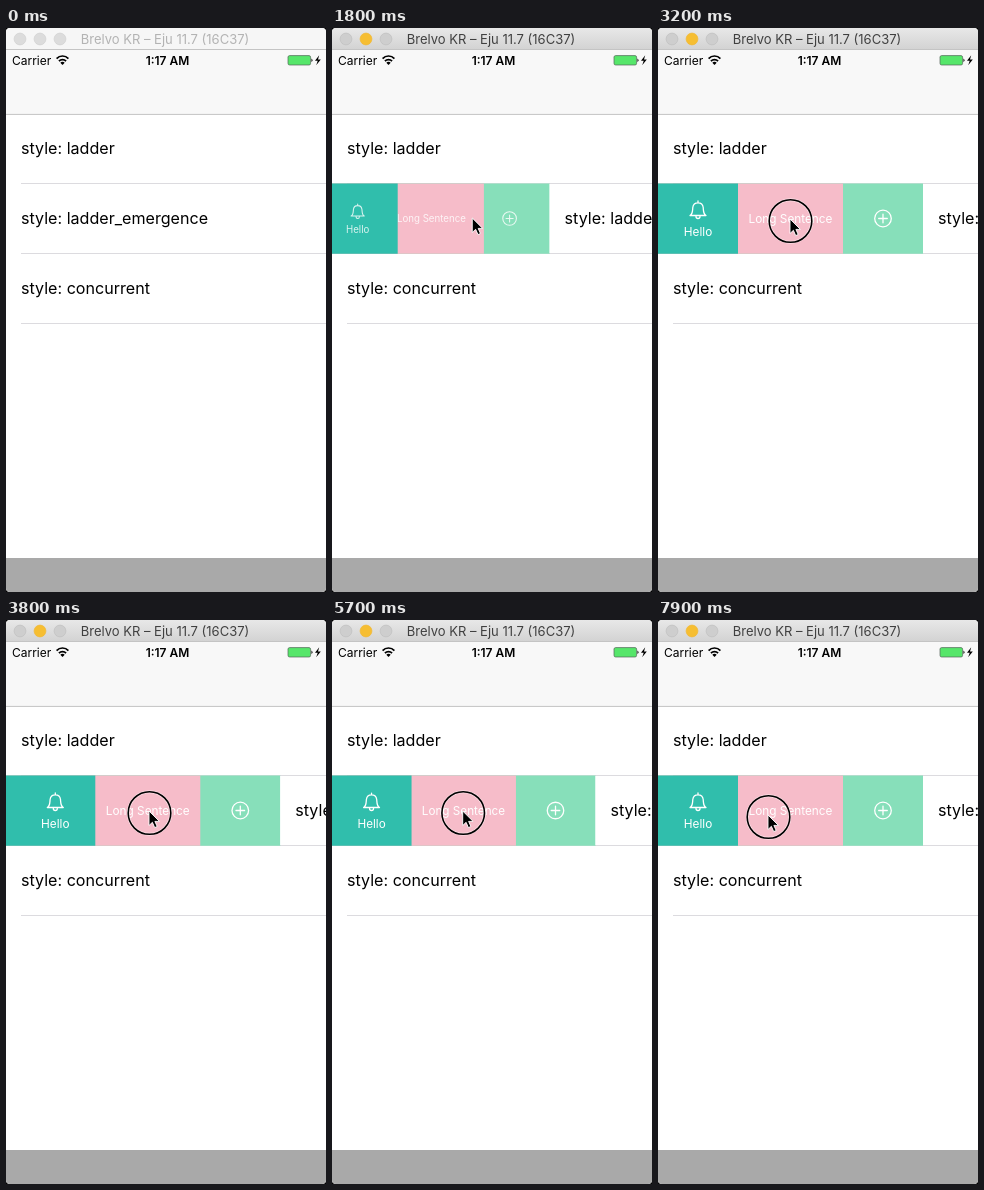
An HTML page that plays this animation: 320 by 564 pixels, repeating every 8000 ms.

```html
<!DOCTYPE html>
<html lang="en">
<head>
<meta charset="utf-8">
<title>Swipe cell styles</title>
<style>
  html, body { margin: 0; height: 100%; overflow: hidden; background: #000; }
  svg { display: block; width: 100%; height: 100%; font-family: Inter, "Open Sans", sans-serif; }
  .row { font-size: 16.1px; fill: #000; }
  .status { font-size: 12px; fill: #000; }
  .label { font-size: 11.8px; fill: #fff; text-anchor: middle; }
  .icon { fill: none; stroke: #fff; stroke-width: 1.3; stroke-linecap: round; stroke-linejoin: round; }
  .light { fill: #dcdcdc; stroke: #d4d4d4; stroke-width: .8; }
  #bar { fill: #f6f6f6; }
  #title { font-size: 13px; text-anchor: middle; fill: #b3b3b3; }
  .active #bar { fill: url(#metal); }
  .active #title { fill: #404040; }
  .active .light { fill: #cecece; stroke: #c2c2c2; }
  .active .yellow { fill: #f6be32; stroke: #f0b93a; }
</style>
</head>
<body>
<svg id="stage" viewBox="0 0 320 564">
  <defs>
    <linearGradient id="metal" x2="0" y2="1">
      <stop stop-color="#e8e8e8"/><stop offset="1" stop-color="#d2d2d2"/>
    </linearGradient>
    <clipPath id="window"><rect width="320" height="564" rx="4"/></clipPath>
    <clipPath id="cellArea"><rect y="155.4" width="320" height="70.3"/></clipPath>
  </defs>
  <g clip-path="url(#window)">
    <rect width="320" height="564" fill="#fff"/>
    <rect id="bar" width="320" height="22"/>
    <path d="M0 21.5H320" stroke="#c4c4c4"/>
    <circle class="light" cx="14" cy="11" r="5.9"/>
    <circle class="light yellow" cx="34" cy="11" r="5.9"/>
    <circle class="light" cx="54" cy="11" r="5.9"/>
    <text id="title" x="159" y="16">Brelvo KR – Eju 11.7 (16C37)</text>

    <rect y="22" width="320" height="64" fill="#f8f8f8"/>
    <path d="M0 86.4H320" stroke="#c3c3c3"/>
    <text class="status" x="6" y="36.7">Carrier</text>
    <g fill="none" stroke="#000" stroke-width="1.7">
      <path d="M50.6 30.6a8 8 0 0 1 11.8 0M52.9 33.1a5 5 0 0 1 7.2 0"/>
      <path d="M56.5 37l-2.2-2.3a3.2 3.2 0 0 1 4.4 0z" fill="#000" stroke="none"/>
    </g>
    <text class="status" x="161.5" y="36.7" font-weight="600" text-anchor="middle">1:17 AM</text>
    <rect x="282" y="27.6" width="22.6" height="9.4" rx="1.6" fill="#56e66a" stroke="#55645a" stroke-width=".7"/>
    <path d="M305.4 30.5a2 2 0 0 1 0 3.6z" fill="#222"/>
    <path d="M313.2 27.2l-4.2 5.6h2.7l-1.5 4.4 4.6-5.8h-2.8z"/>

    <text class="row" x="15" y="126">style: ladder</text>
    <text class="row" x="15" y="266">style: concurrent</text>
    <path d="M15 155.5H320M15 225.5H320M15 295.5H320" stroke="#dcdbdf"/>

    <g clip-path="url(#cellArea)">
      <g class="button">
        <rect x="-400" y="155" width="400" height="71" fill="#87dfba"/>
        <g class="content icon">
          <circle cy="190.5" r="8.3"/><path d="M-4.3 190.5H4.3M0 186.2V194.8"/>
        </g>
      </g>
      <g class="button">
        <rect x="-400" y="155" width="400" height="71" fill="#f6bcc9"/>
        <g class="content"><text class="label" y="195.3">Long Sentence</text></g>
      </g>
      <g class="button">
        <rect x="-400" y="155" width="400" height="71" fill="#30beac"/>
        <g class="content">
          <path class="icon" d="M-8 187.5C-5 186-5.5 182-5.2 179.5C-4.8 176-2.5 174.8 0 174.8S4.8 176 5.2 179.5C5.5 182 5 186 8 187.5ZM-2 188.5a2 2 0 0 0 4 0M0 173v1.5"/>
          <text class="label" y="207.8">Hello</text>
        </g>
      </g>
      <g id="cell">
        <rect y="156" width="320" height="69" fill="#fff"/>
        <text class="row" x="15" y="196">style: ladder_emergence</text>
      </g>
    </g>

    <rect y="530" width="320" height="34" fill="#a9a9a9"/>
    <g id="pointer">
      <g id="ring" fill="none">
        <circle cx=".5" cy="2" r="21.2" stroke="#fff" stroke-opacity=".5" stroke-width="3"/>
        <circle cx=".5" cy="2" r="21.3" stroke="#000" stroke-width="1.6"/>
      </g>
      <path d="M0 0V14.5L3.4 11.3L5.7 16.6L8.2 15.5L5.9 10.4H10.4Z" stroke="#fff" stroke-width=".9"/>
    </g>
  </g>
</svg>
<script>
const LOOP = 8000, STEP = 100, OPEN = 265;
const $ = id => document.getElementById(id);
const stage = $('stage'), cell = $('cell'), pointer = $('pointer'), ring = $('ring');
const [plus, sentence, hello] = document.querySelectorAll('.button');

const smooth = u => u * u * (3 - 2 * u);
const easeOut = u => 1 - (1 - u) ** 3;
const mix = (a, b, u) => a + (b - a) * u;

// Each key is [time, value, easing into this key].
function track(keys, t) {
  const i = keys.findIndex(key => key[0] > t);
  if (i < 0) return keys[keys.length - 1][1];
  if (i === 0) return keys[0][1];
  const [t0, v0] = keys[i - 1], [t1, v1, ease = smooth] = keys[i];
  return mix(v0, v1, ease((t - t0) / (t1 - t0)));
}

const pointerX = [[500, 97], [1200, 35.5], [1300, 35.5], [1700, 140], [2000, 141], [2300, 141],
  [3100, 132], [3200, 132], [3800, 143], [4700, 154], [4900, 154], [5500, 130.7], [6000, 130.7],
  [6700, 128], [7000, 128], [7800, 110]];
const pointerY = [[500, 295], [1200, 188.5], [1300, 188.5], [1700, 190], [2300, 190], [3100, 191],
  [7000, 191], [7800, 195]];
const cellOffset = [[1300, 0], [1700, 105], [2000, OPEN, easeOut], [3200, OPEN], [3800, 274.3],
  [4700, 287], [4900, 287], [5500, 263.5], [6000, 263.5], [6500, OPEN, easeOut]];
const expansion = [[4100, 0], [4400, 1, easeOut], [4900, 1], [5300, 0, easeOut]];
const presses = [[200, 500], [1200, 1700], [3200, 6100], [7900, 8000]];

function placeButton(button, right, inset, scale) {
  button.setAttribute('transform', `translate(${right} 0)`);
  const content = button.querySelector('.content');
  content.setAttribute('transform',
    `translate(${-inset} 190.5) scale(${scale}) translate(0 -190.5)`);
  content.setAttribute('opacity', scale);
}

function draw(t) {
  const offset = track(cellOffset, t), grow = track(expansion, t);
  const progress = Math.min(1, offset / OPEN), over = Math.max(0, offset - OPEN);
  placeButton(plus, offset, 40, progress);
  placeButton(sentence, 185 * progress + over, 52.5, progress);
  placeButton(hello, mix(80 * progress + over, offset, grow), 40 + 6 * grow, progress);
  cell.setAttribute('transform', `translate(${offset} 0)`);

  stage.classList.toggle('active', t >= 500);
  pointer.style.display = t < 100 ? 'none' : '';
  pointer.setAttribute('transform', `translate(${track(pointerX, t)} ${track(pointerY, t)})`);
  ring.style.display = presses.some(([from, to]) => t >= from && t < to) ? '' : 'none';
}

const start = performance.now();
function tick() {
  const t = (performance.now() - start) % LOOP;
  draw(Math.floor(t / STEP) * STEP);
  requestAnimationFrame(tick);
}
tick();
</script>
</body>
</html>
```
